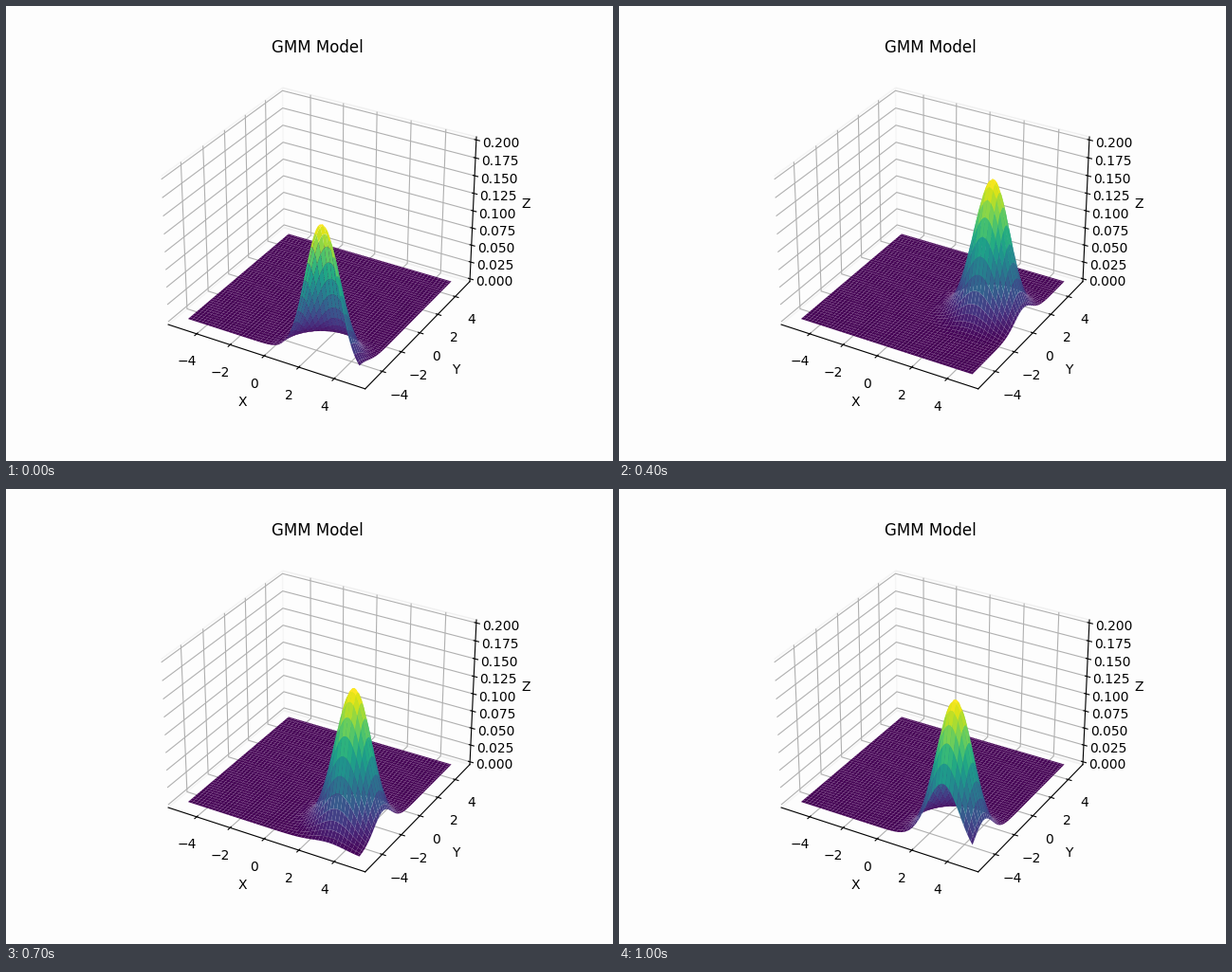
These frames come from a looping animation (640x480 px, 1100 ms). A matplotlib script:

```python
import matplotlib.pyplot as plt
import numpy as np
from matplotlib.animation import FuncAnimation

INTERVAL = 100
PAPER = "#fdfdfd"
VAR = 0.84  # shared isotropic variance
LIM = 5.5 * 25 / 24

# Stage of the journey shown at each step: a climb, then jumps back and forth.
STAGES = [0, 1.5, 3, 3.5, 4, 5, 6, 2, 5, 1.5, 1]

axis = np.linspace(-5, 5, 100)
X, Y = np.meshgrid(axis, axis)


def bump(weight, mx, my):
    r2 = (X - mx) ** 2 + (Y - my) ** 2
    return weight * np.exp(-r2 / (2 * VAR)) / (2 * np.pi * VAR)


def main_center(s):
    """Travel along y with a dying sway in x, then creep on after the split."""
    sway = 0.36 * max(0, 1 - (s / 4) ** 2)
    x = 3.1 + sway * np.sin(np.pi / 2 * (s - 0.48))
    y = -5 + 1.05 * s + 0.07 * s ** 2 if s <= 4 else 0.3 + 0.2 * (s - 4) ** 2
    return x, y


def density(s):
    """One component up to stage 4, a second by stage 5, a third by stage 6."""
    split = [4, 5, 6]
    main = bump(np.interp(s, split, [1, 0.55, 0.455]), *main_center(s))
    right = bump(np.interp(s, split, [0, 0.42, 0.3]),
                 np.interp(s, [5, 6], [2.97, 2.28]), 4.5)
    left = bump(np.interp(s, [5, 6], [0, 0.2]), -1.22, 3.45)
    return main + right + left


fig = plt.figure(figsize=(6.4, 4.8), dpi=100, facecolor=PAPER)
ax = fig.add_subplot(projection="3d", facecolor=PAPER)
ax.set_title("GMM Model")
ax.set_xlabel("X")
ax.set_ylabel("Y")
ax.set_zlabel("Z")
ax.set_xticks(np.arange(-4, 5, 2))
ax.set_yticks(np.arange(-4, 5, 2))
ax.set_zticks(np.linspace(0, 0.2, 9))
ax.set_xlim(-LIM, LIM, view_margin=0)
ax.set_ylim(-LIM, LIM, view_margin=0)
ax.set_zlim(-0.2 / 48, 0.2 + 0.2 / 48, view_margin=0)

# Bare walls with only a faint outline.
for wall, grey in ((ax.xaxis, 0.96), (ax.yaxis, 0.94), (ax.zaxis, 0.95)):
    wall.set_pane_color((grey, grey, grey, 1))
    wall.pane.set_fill(False)

surfaces = []


def clear():
    while surfaces:
        surfaces.pop().remove()
    return []


def update(stage):
    clear()
    surfaces.append(ax.plot_surface(X, Y, density(stage), cmap="viridis"))
    return surfaces


anim = FuncAnimation(fig, update, frames=STAGES, init_func=clear,
                     interval=INTERVAL, repeat=True, repeat_delay=0)
plt.show()
```
